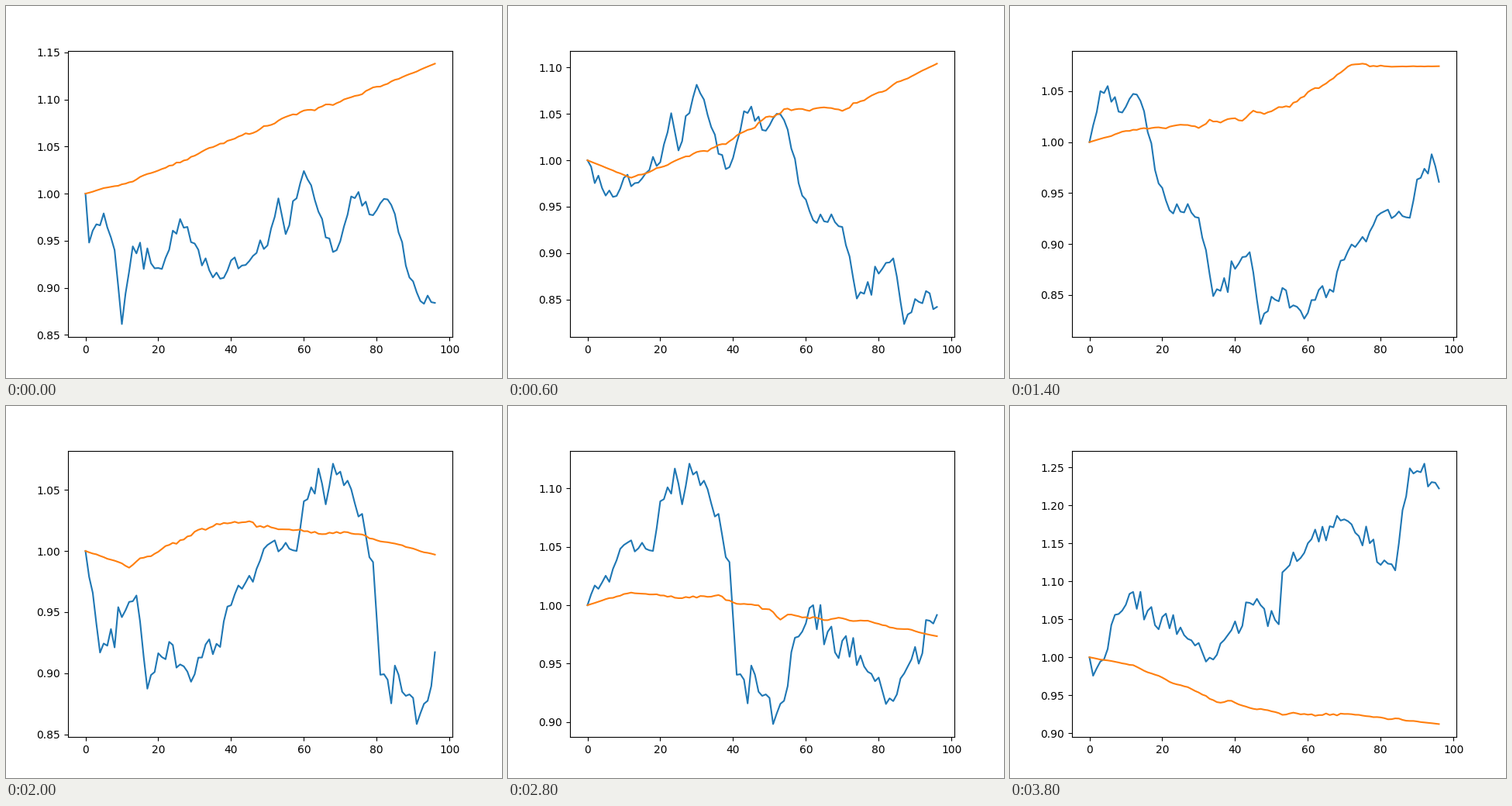
Recreate the animation shown at these times as a matplotlib script. Size 640 by 480 pixels, loop 4 s.

```python
import numpy as np
import matplotlib.pyplot as plt
from matplotlib.animation import FuncAnimation

FRAMES, STEP, WINDOW = 20, 10, 97
TOTAL = STEP * (FRAMES - 1) + WINDOW

# Main turning points of the price: (day, value)
TURNS = np.array([
    (0, 1), (1, .948), (5, .979), (8, .94), (10, .8615), (13, .944),
    (21, .92), (26, .973), (30, .947), (35, .911), (50, .945), (53, .995),
    (55, .957), (60, 1.024), (68, .938), (70, .9495), (73, .997),
    (84, .988), (92, .886), (100, .879), (104, .806), (114, .847),
    (117, .78), (120, .8055), (129, .785), (140, .84), (151, .885),
    (158, .879), (160, .9147), (170, .936), (179, .871), (181, .79),
    (190, .7734), (191, .7546), (201, .838), (216, .796), (222, .769),
    (236, .833), (242, .807), (243, .86), (260, .914), (274, .862),
    (278, .966), (286, .9455),
])

# Shape of the portfolio curve at a few windows, bent at the days in KNOTS
KNOTS = [0, 12, 36, 54, 72, 96]
SHAPES = {
    0: (1, 1.012, 1.051, 1.078, 1.101, 1.138),
    3: (1, .981, 1.015, 1.056, 1.058, 1.104),
    7: (1, 1.013, 1.021, 1.034, 1.0755, 1.0745),
    10: (1, .988, 1.0235, 1.02, 1.015, .997),
    12: (1, 1.028, 1.015, 1.014, .9955, .971),
    16: (1, .995, .998, .967, .981, .976),
    19: (1, .9895, .94, .926, .925, .912),
}

rng = np.random.default_rng(4)
days = np.arange(TOTAL)
span = np.arange(WINDOW)

# Daily noise that fades out towards each turning point
turn_days, turn_values = TURNS.T
gap = np.abs(days[:, None] - turn_days).min(axis=1)
noise = np.clip(rng.normal(0, .009, TOTAL), -.015, .015)
price = np.interp(days, turn_days, turn_values) + noise * np.minimum(gap, 3) / 3

ripple = np.convolve(rng.normal(0, .003, TOTAL + 2), np.ones(3) / 3, "valid")
fade = np.sin(np.pi * span / (WINDOW - 1))


def portfolio(frame):
    knots = [np.interp(frame, list(SHAPES), col)
             for col in zip(*SHAPES.values())]
    return np.interp(span, KNOTS, knots) + fade * ripple[frame * STEP + span]


fig, ax = plt.subplots(figsize=(6.4, 4.8), dpi=100)


def draw(frame):
    view = price[frame * STEP + span]
    ax.clear()
    ax.plot(view / view[0])
    ax.plot(portfolio(frame))
    return ax.lines


anim = FuncAnimation(fig, draw, frames=FRAMES, interval=200, repeat=True,
                     repeat_delay=0, blit=False)
plt.show()
```
